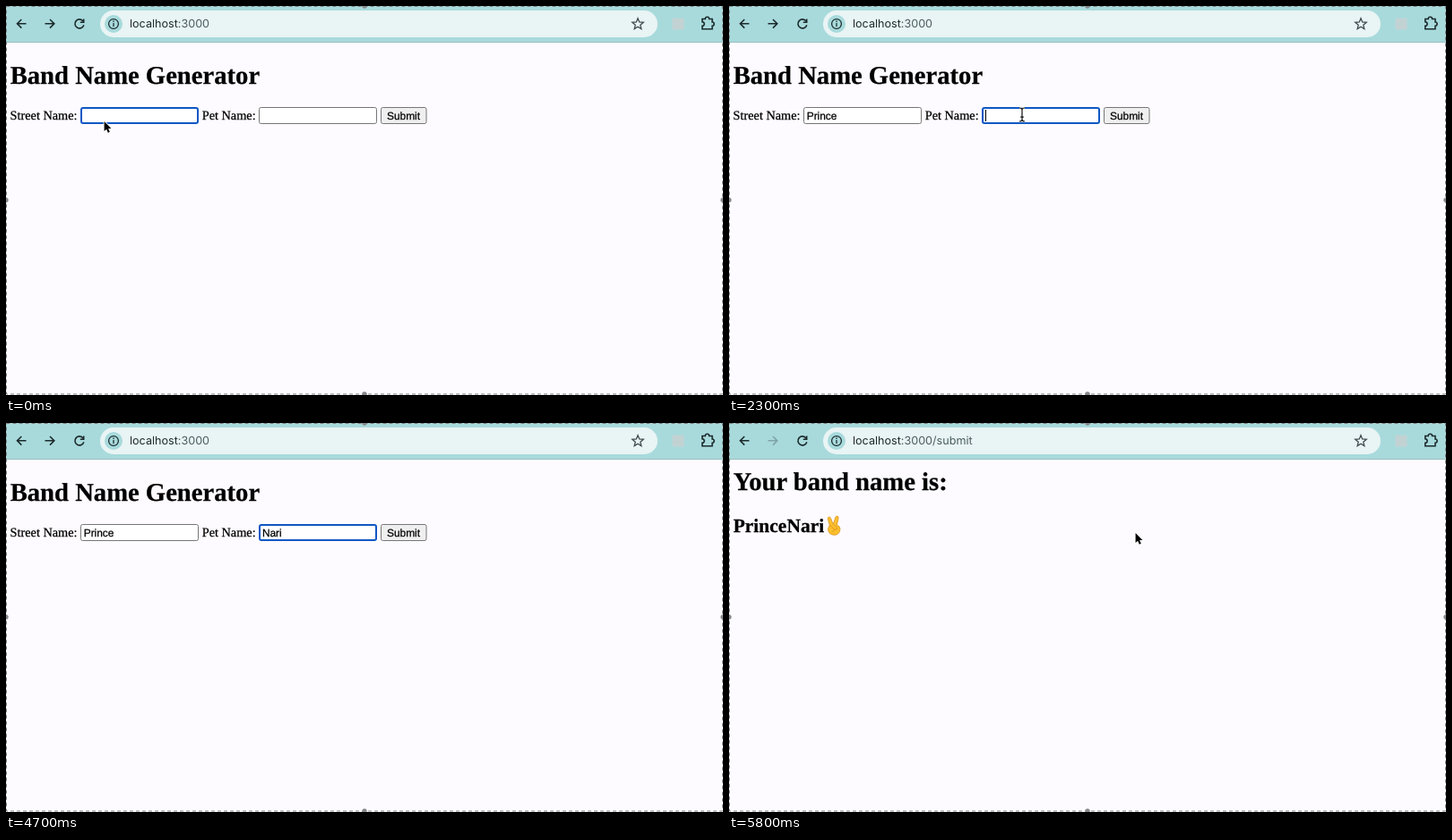
Animation, 800 px wide and 435 px high, one loop 6000 ms. Source, as an HTML page:

```html
<!DOCTYPE html>
<html lang="en">
<head>
<meta charset="utf-8">
<title>Band Name Generator</title>
<style>
  html, body { margin: 0; width: 100%; height: 100%; overflow: hidden; background: #fdfbff; }
  svg { display: block; width: 800px; height: 435px; }
  text { stroke: #000; stroke-width: .25; text-rendering: geometricPrecision; }
  .serif { font: 14.3px "Liberation Serif", "Times New Roman", serif; }
  .title { font-size: 28.65px; font-weight: bold; }
  .name { font-size: 21.5px; font-weight: bold; }
  .sans { font: 11.92px "Liberation Sans", Arial, sans-serif; }
  .url { font: 12.6px Inter, Roboto, sans-serif; fill: #1f2a2c; stroke: none; }
  .url .dim { fill: #4a5d60; }
  .icon { fill: none; stroke: #1c2a2c; stroke-width: 1.6; }
  .thin { stroke-width: 1.25; }
  .field rect { x: .5px; y: .5px; width: 131px; height: 18px; fill: #fff; stroke: #767676; }
  .field.focus rect { x: 1px; y: 1px; width: 130px; height: 17px; stroke: #0f57c4; stroke-width: 2; }
  .hand { fill: #fbc02d; stroke: #d98a1c; stroke-width: .7; stroke-linejoin: round; }
</style>
</head>
<body>
<svg viewBox="0 0 800 435">
  <rect width="800" height="435" fill="#fdfbff"/>
  <rect width="800" height="40" fill="#a8dadc"/>
  <path d="M0 40.5H800" stroke="#9bbfc2"/>

  <g class="icon">
    <path d="M22.5 19.8H12.8M17.3 15L12.5 19.8L17.3 24.6"/>
    <path id="forward" d="M43.5 19.8H53.7M49 15L53.8 19.8L49 24.6"/>
    <path id="reload" d="M86 16.9A5 5 0 1 0 86.8 21.2M86.7 14.4V18.3H82.8"/>
    <path id="stop" d="M77.6 15.4L86.4 24.2M86.4 15.4L77.6 24.2"/>
  </g>
  <rect x="105" y="5" width="622" height="30" rx="15" fill="#e9f4f4"/>
  <circle cx="120" cy="20" r="10" fill="#a8dadc"/>
  <g class="icon thin">
    <circle cx="120" cy="20" r="5.4"/>
    <path d="M120 19V23M120 16.6V18"/>
    <path id="star" stroke="#3b4a4d"/>
  </g>
  <path class="icon" d="M776.8 14.5H780.2A2.2 2.2 0 0 1 784.6 14.5H788V18A2.1 2.1 0 0 1 788 22.2V25.7H776.8V22.4A2.3 2.3 0 0 0 776.8 17.8Z"/>
  <text class="url" x="138" y="24.4">localhost<tspan class="dim">:3000<tspan id="path"></tspan></tspan></text>
  <rect x="743.5" y="13.5" width="13" height="13" rx="1" fill="#c2d2d3"/>

  <g id="form" class="serif">
    <text class="title" x="4.7" y="87">Band Name Generator</text>
    <text x="4.5" y="127">Street Name:</text>
    <text x="218.7" y="127">Pet Name:</text>
    <g id="street" class="field sans" transform="translate(83 113)">
      <rect rx="2"/>
      <text x="3.7" y="13.6"></text>
      <path class="caret" d="M.5 3V16" stroke="#000"/>
    </g>
    <g id="pet" class="field sans" transform="translate(282 113)">
      <rect rx="2"/>
      <text x="3.9" y="13.6"></text>
      <path class="caret" d="M.5 3V16" stroke="#000"/>
    </g>
    <rect id="button" x="418.5" y="113.5" width="50.5" height="18" rx="2" stroke="#767676"/>
    <text class="sans" x="425" y="126.6">Submit</text>
  </g>

  <g id="result" class="serif">
    <text class="title" x="4.7" y="75">Your band name is:</text>
    <text class="name" x="4.7" y="122">PrinceNari</text>
    <g class="hand">
      <path d="M112.4 115L110.3 107.4Q110 105.5 111.5 105.1Q113 104.8 113.6 106.6L116.2 113.3L118.8 105.5Q119.5 103.7 121 104.2Q122.5 104.7 122.1 106.6L120.4 114.2Q124 115 124 118.5Q123.7 124.8 118 125.3Q112.3 125.3 110.8 120.8Q109.8 117 112.4 115Z"/>
      <path d="M111.5 115.4Q113.5 113.9 115 116L117.2 119.4M116.8 114.6Q119 113.6 120 116.1L120.5 119Q117 118.3 115.4 121.8" fill="none"/>
    </g>
  </g>

  <rect x=".5" y=".5" width="799" height="433.5" fill="none" stroke="#7d8183" stroke-dasharray="4 3"/>
  <g fill="#85888b">
    <circle cx="400" cy="0" r="2.7"/><circle cx="400" cy="434" r="2.7"/>
    <circle cx="0" cy="217" r="2.7"/><circle cx="800" cy="217" r="2.7"/>
  </g>

  <g id="pointer">
    <path id="arrow" transform="translate(.6 .9) scale(.9)" d="M0 0V12.4L2.8 9.9L4.7 14.2L6.9 13.2L5 9.1H8.7Z" stroke="#fff" stroke-width="2" paint-order="stroke"/>
    <g id="beam" fill="none">
      <path d="M-3 -7Q0 -7 0 -5Q0 -7 3 -7M0 -5V6M-3 8Q0 8 0 6Q0 8 3 8M-1.8 3.2H1.8" stroke="#fff" stroke-width="2.6"/>
      <path d="M-3 -7Q0 -7 0 -5Q0 -7 3 -7M0 -5V6M-3 8Q0 8 0 6Q0 8 3 8M-1.8 3.2H1.8" stroke="#111" stroke-width="1.2"/>
    </g>
  </g>
</svg>
<script>
const LOOP = 6000, STEP = 100;
const $ = id => document.getElementById(id);
const toggle = (el, on) => { el.style.display = on ? '' : 'none'; };
const show = (id, on) => toggle($(id), on);
const within = (t, spans) => spans.some(([a, b]) => t >= a && t < b);

const fields = {
  street: { word: 'Prince', keys: [300, 600, 700, 800, 1000, 1200], focus: [0, 2200] },
  pet: { word: 'Nari', keys: [3600, 3800, 4000, 4200], focus: [2200, 5500] }
};
const caretOn = [[100, 1700], [2200, 2800], [3300, 4700], [5200, 5500]];
const pointerOn = [[0, 300], [1400, 3600], [4800, LOOP]];
// time, x, y
const route = [
  [0, 109, 128], [1300, 109, 128], [1500, 128, 136], [1700, 215, 134],
  [2000, 322, 122], [2200, 327, 121], [4800, 327, 121], [5000, 338, 121],
  [5200, 398, 125], [5400, 449, 126], [5600, 453, 122], [LOOP, 453, 122]
];

function pointerAt(t) {
  const i = Math.max(1, route.findIndex(p => p[0] >= t));
  const [t0, x0, y0] = route[i - 1], [t1, x1, y1] = route[i];
  const k = (t - t0) / (t1 - t0);
  return [x0 + (x1 - x0) * k, y0 + (y1 - y0) * k];
}

function starPath(cx, cy, outer, inner) {
  const points = Array.from({ length: 10 }, (_, i) => {
    const r = i % 2 ? inner : outer, a = (i / 5 - .5) * Math.PI;
    return `${cx + r * Math.cos(a)} ${cy + r * Math.sin(a)}`;
  });
  return `M${points.join('L')}Z`;
}

function drawField(id, t) {
  const { word, keys, focus } = fields[id];
  const text = $(id).querySelector('text'), caret = $(id).querySelector('.caret');
  const focused = within(t, [focus]);
  text.textContent = word.slice(0, keys.filter(k => k <= t).length);
  $(id).classList.toggle('focus', focused);
  const end = text.textContent ? text.getComputedTextLength() : 0;
  caret.setAttribute('transform', `translate(${Math.round(+text.getAttribute('x') + end)})`);
  toggle(caret, focused && within(t, caretOn));
}

function draw(t) {
  const submitted = t >= 5700, loading = submitted && t < 5800;
  show('form', !submitted);
  show('result', submitted);
  show('reload', !loading);
  show('stop', loading);
  $('path').textContent = submitted ? '/submit' : '';
  $('forward').style.stroke = submitted ? '#7fa3a6' : '';
  $('button').setAttribute('fill', t >= 5500 ? '#f5f5f5' : '#efefef');
  if (!submitted) Object.keys(fields).forEach(id => drawField(id, t));

  const [x, y] = pointerAt(t);
  const overField = t >= 1400 && y > 113 && y < 132 &&
    ((x > 83 && x < 215) || (x > 282 && x < 414));
  show('pointer', within(t, pointerOn));
  show('arrow', !overField);
  show('beam', overField);
  $('pointer').setAttribute('transform', `translate(${x} ${y})`);
}

$('star').setAttribute('d', starPath(705, 20.3, 6.6, 2.9));
const start = performance.now();
function tick() {
  const t = (performance.now() - start) % LOOP;
  draw(Math.floor(t / STEP) * STEP);
  requestAnimationFrame(tick);
}
tick();
</script>
</body>
</html>
```
